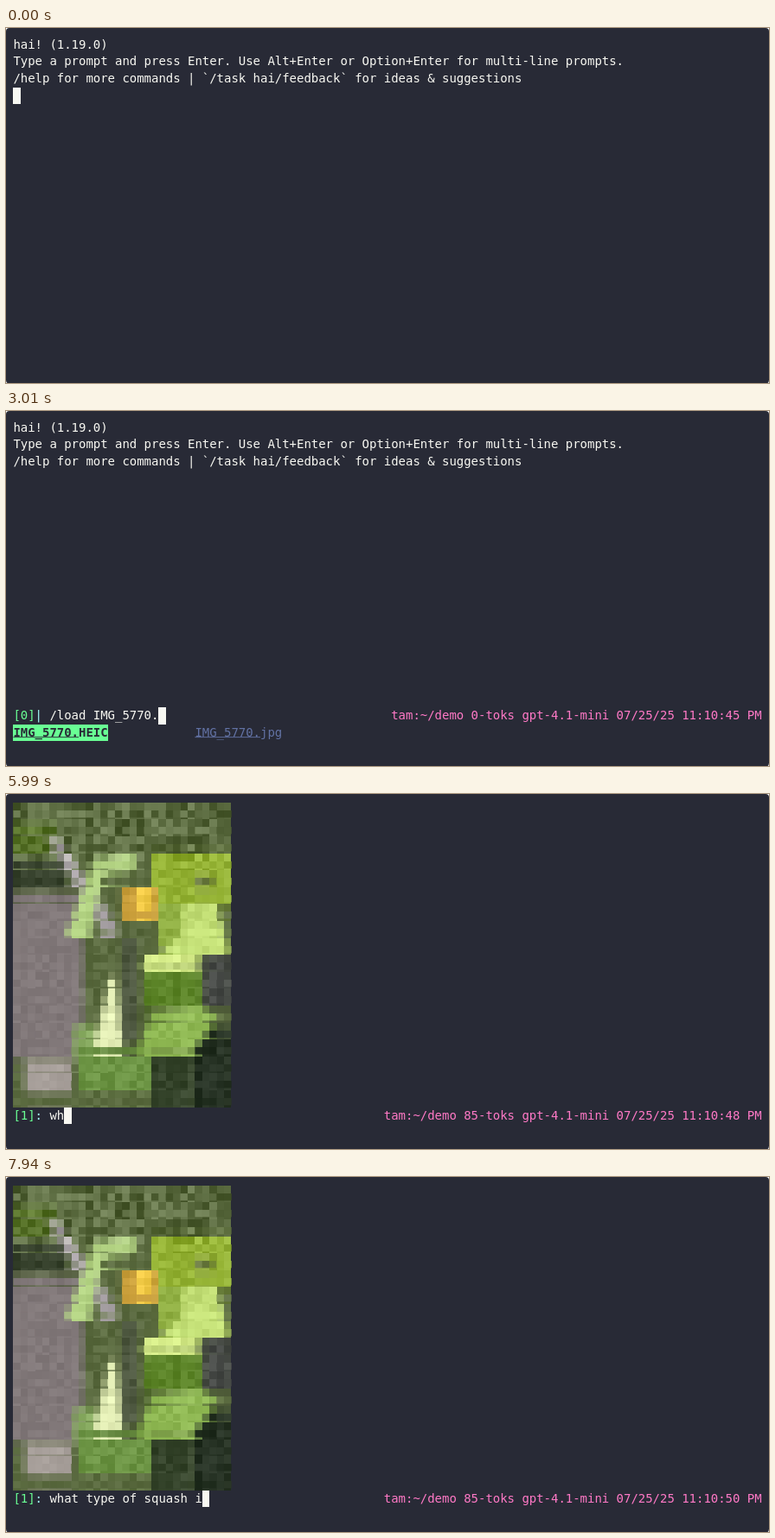
These frames come from a looping animation (882 px wide and 411 px high, 8 s). An HTML page with a canvas:

```html
<!DOCTYPE html>
<html lang="en">
<head>
<meta charset="utf-8">
<title>Terminal session</title>
<style>
html, body { margin: 0; width: 100%; height: 100%; overflow: hidden; background: #fff; }
canvas { display: block; }
</style>
</head>
<body>
<canvas id="stage" width="882" height="411"></canvas>
<script>
const LOOP = 8000;
const CW = 8.4, RH = 19.6, TOP = 9.8;
const COLS = 30, ROWS = 36;
const FONT = '14px "DejaVu Sans Mono", monospace';
const BG = '#282a36', FG = '#f8f8f2', GREEN = '#69ff94',
      CYAN = '#a4ffff', PINK = '#ff79c6', GRAY = '#6272a4';

const stage = document.getElementById('stage');
const ctx = stage.getContext('2d');

const cellX = col => (col + 1) * CW;
const cellY = row => TOP + row * RH;

// Filled cells snap to whole pixels.
function block(g, col, row, n, color) {
  const x = Math.round(cellX(col)), y = Math.round(cellY(row));
  g.fillStyle = color;
  g.fillRect(x, y, Math.round(cellX(col + n)) - x, Math.round(cellY(row + 1)) - y);
}

function print(g, text, col, row, color, bold) {
  g.font = (bold ? 'bold ' : '') + FONT;
  g.fillStyle = color;
  [...text].forEach((ch, i) => {
    if (ch !== ' ') g.fillText(ch, cellX(col + i), cellY(row) + 14);
  });
}

// Photo: a few flat shapes, [color, x, y, w, h] or [color, x, y, x, y, ...].
const SHAPES = [
  ['#5f7a30', 8, 36, 50, 32],
  ['#37422d', 8, 78, 62, 32],
  ['#817879', 8, 115, 82, 192],
  ['#96b436', 168, 68, 92, 62],
  ['#6e7d44', 218, 96, 22, 14],
  ['#8fae42', 176, 127, 36, 50],
  ['#b2abb0', 46, 50, 62, 54, 132, 160, 116, 165],
  ['#b6d686', 102, 76, 150, 68, 150, 88, 112, 96, 96, 166, 68, 166],
  ['#c3df76', 206, 127, 242, 127, 260, 184, 152, 204, 200, 166],
  ['#d5eb88', 160, 186, 62, 18],
  ['#484b48', 228, 187, 32, 60],
  ['#5c8428', 160, 206, 66, 42],
  ['#505a42', 134, 166, 18, 122],
  ['#85a85e', 78, 268, 28, 40],
  ['#6c9444', 84, 296, 84, 48],
  ['#a9a19c', 22, 308, 54, 38],
  ['#243022', 218, 270, 42, 92],
  ['#36452c', 168, 304, 50, 58],
  ['#90b954', 168, 255, 222, 244, 246, 260, 214, 302, 151, 302],
  ['#e6f0b8', 120, 214, 127, 214, 135, 293, 101, 293],
  ['#c99e3a', 134, 108, 42, 39],
  ['#f2cb47', 151, 108, 18, 29]
];

function hash(x, y) {
  const v = Math.sin(x * 127.1 + y * 311.7) * 43758.5453;
  return v - Math.floor(v);
}

function grain(x, y) {
  if (y < 7) return 64;
  return x < 9 && y > 10 ? 16 : 28;
}

function newCanvas(w, h) {
  const c = document.createElement('canvas');
  c.width = w;
  c.height = h;
  return c;
}

function makePhoto() {
  const g = newCanvas(COLS, ROWS).getContext('2d');
  g.fillStyle = '#5b6b40';
  g.fillRect(0, 0, COLS, ROWS);
  g.scale(1 / CW, 2 / RH);
  g.translate(-CW, -TOP);
  for (const [color, ...p] of SHAPES) {
    g.fillStyle = color;
    if (p.length === 4) {
      g.fillRect(...p);
      continue;
    }
    g.beginPath();
    for (let i = 0; i < p.length; i += 2) g.lineTo(p[i], p[i + 1]);
    g.fill();
  }
  const px = g.getImageData(0, 0, COLS, ROWS).data;
  const tone = (x, y) => {
    const i = (y * COLS + x) * 4;
    const d = (hash(x, y) - 0.5) * grain(x, y);
    return `rgb(${[0, 1, 2].map(k => Math.max(0, Math.min(255, Math.round(px[i + k] + d))))})`;
  };

  // Two tones per cell: background above, half-block glyph below.
  const out = newCanvas(stage.width, stage.height), o = out.getContext('2d');
  for (let row = 0; row < ROWS / 2; row++) {
    for (let col = 0; col < COLS; col++) block(o, col, row, 1, tone(col, row * 2));
    for (let col = 0; col < COLS; col++) print(o, '▄', col, row, tone(col, row * 2 + 1));
  }
  return out;
}

const photo = makePhoto();

const LOAD = '/load IMG_577';
const LOAD_KEYS = [460, 780, 950, 950, 1030, 1170, 1350, 1425, 1500, 2110, 2540, 2740, 2890];
const ASK = 'what type of squash i';
const ASK_KEYS = [
  ...Array.from({ length: 9 }, (_, i) => 5890 + i * 76.25),
  6580, 6630, 6720, 6790, 6860,
  ...Array.from({ length: 5 }, (_, i) => 7030 + i * 105),
  7840, 7940
];

const typed = (text, keys, t) => text.slice(0, keys.filter(k => k <= t).length);

// The clock is only redrawn together with an input event.
const TICKS = [460, 1170, 2110, 3100, 4150, 5190, 6110, 7130];
function clock(t) {
  const n = TICKS.filter(k => k <= t).length;
  return t >= 3010 && t < 4150 ? 45 : 42 + n;
}

function prompt(n, mark, input, row, tokens, t) {
  print(ctx, `[${n}]`, 0, row, GREEN);
  print(ctx, mark, 3, row, CYAN);
  print(ctx, input, 5, row, FG);
  const status = `tam:~/demo ${tokens}-toks gpt-4.1-mini 07/25/25 11:10:${clock(t)} PM`;
  print(ctx, status, 103 - status.length, row, PINK);
}

const cursor = (col, row) => block(ctx, col, row, 1, FG);

function menuItem(text, col, on) {
  const color = on ? BG : GRAY;
  if (on) block(ctx, col, 18, text.length, GREEN);
  print(ctx, text, col, 18, color, on);
  ctx.fillRect(cellX(col), cellY(18) + 14.6, CW * 9, 0.9);
}

function intro() {
  print(ctx, 'hai! (1.19.0)', 0, 0, FG);
  print(ctx, 'Type a prompt and press Enter. Use Alt+Enter or Option+Enter for multi-line prompts.', 0, 1, FG);
  print(ctx, '/help for more commands | `/task hai/feedback` for ideas & suggestions', 0, 2, FG);
}

function draw(t) {
  ctx.clearRect(0, 0, stage.width, stage.height);
  ctx.fillStyle = BG;
  ctx.beginPath();
  ctx.roundRect(0, 0, 882, 411.6, 4);
  ctx.fill();

  if (t >= 5190) {
    ctx.drawImage(photo, 0, 0);
    const input = typed(ASK, ASK_KEYS, t);
    prompt(1, ':', input, 18, 85, t);
    cursor(5 + input.length, 18);
    return;
  }

  intro();
  if (t < 30) {
    cursor(0, 3);
  } else if (t < 3010) {
    const input = typed(LOAD, LOAD_KEYS, t);
    prompt(0, ':', input, 18, 0, t);
    cursor(5 + input.length, 18);
  } else if (t < 4440) {
    prompt(0, '|', '/load IMG_5770.', 17, 0, t);
    cursor(20, 17);
    menuItem('IMG_5770.HEIC', 0, t < 4150);
    menuItem('IMG_5770.jpg', 25, t >= 4150);
  } else {
    prompt(0, ':', '/load IMG_5770.jpg', 17, 0, t);
    if (t < 4740) cursor(23, 17);
    else cursor(0, 18);
  }
}

function frame() {
  draw(performance.now() % LOOP);
  requestAnimationFrame(frame);
}
frame();
</script>
</body>
</html>
```
